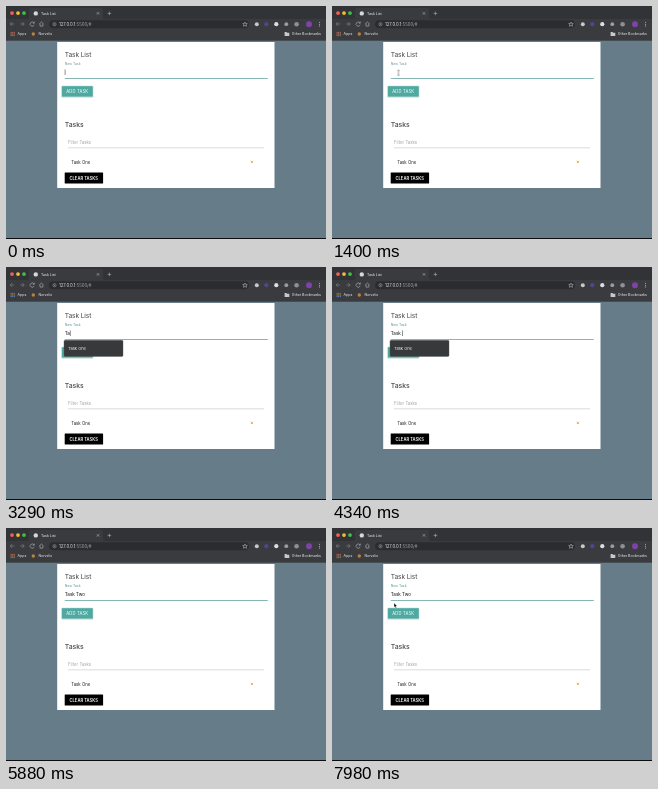
Write an HTML page that moves like this. It is 320 by 233 pixels and loops after 8000 ms.

```html
<!DOCTYPE html>
<html lang="en">
<head>
<meta charset="utf-8">
<title>Task List</title>
<style>
  html, body { margin: 0; width: 100%; height: 100%; overflow: hidden; background: #667d89; }
  svg { display: block; width: 100%; height: 100%; }
  text { font-family: Inter, Roboto, sans-serif; white-space: pre; }
  .chrome { font-size: 3.5px; font-weight: 500; fill: #d4d5d8; }
  .url { font-size: 4.3px; fill: #e4e5e7; }
  .dim { fill: #a3a5a9; }
  .title { font-size: 6.6px; letter-spacing: -.1px; fill: #444; }
  .strong { font-size: 6.8px; font-weight: 500; letter-spacing: 0; }
  .body { font-size: 4.3px; fill: #222; }
  .button { font-size: 4.2px; letter-spacing: .15px; fill: #fff; }
  .icon { fill: none; stroke: #b4b6b9; stroke-width: .6; }

  #label { font-size: 3.4px; animation: focus 8s linear infinite; }
  #typed { font-size: 4.5px; fill: #111; }
  #list { animation: list 8s step-end infinite; }
  #mouse { animation: move 8s ease-in-out infinite, show 8s step-end infinite; }
  #arrow { animation: arrow 8s step-end infinite; }
  #beam { animation: beam 8s step-end infinite; }

  @keyframes focus {
    0%, 15.75% { fill: #7f8f93; }
    19.25%, 100% { fill: #5a979b; }
  }
  @keyframes list {
    0% { opacity: 0; }
    18.375% { opacity: 1; }
    59.5%, 100% { opacity: 0; }
  }
  @keyframes move {
    0%, 5.25% { transform: translate(6px, 10px); }
    10.5% { transform: translate(98px, 42px); }
    14.875%, 97.125% { transform: translate(66.5px, 66.7px); }
    99.75%, 100% { transform: translate(62px, 75px); }
  }
  @keyframes show {
    0% { opacity: 0; }
    5.25% { opacity: 1; }
    37.625% { opacity: 0; }
    97.125%, 100% { opacity: 1; }
  }
  @keyframes arrow {
    0% { opacity: 1; }
    13.5% { opacity: 0; }
    98.75%, 100% { opacity: 1; }
  }
  @keyframes beam {
    0% { opacity: 0; }
    13.5% { opacity: 1; }
    98.75%, 100% { opacity: 0; }
  }
</style>
</head>
<body>
<svg viewBox="0 0 320 233" preserveAspectRatio="none">
  <!-- Browser window -->
  <rect width="320" height="233" fill="#667d89"/>
  <rect y="232" width="320" height="1" fill="#0c0d0e"/>
  <rect width="320" height="34.7" fill="#3a3b3f"/>
  <rect width="320" height="13" fill="#323336"/>
  <path d="M21 13q2 0 2-2V4q0-2 2-2H95q2 0 2 2v7q0 2 2 2z" fill="#3a3b3f"/>
  <circle cx="6" cy="7.1" r="1.9" fill="#ee6259"/>
  <circle cx="12" cy="7.1" r="1.9" fill="#efbc3c"/>
  <circle cx="18" cy="7.1" r="1.9" fill="#41bf4c"/>
  <circle cx="29.8" cy="7.4" r="2.2" fill="#d5d7da"/>
  <text class="chrome" x="35" y="8.8">Task List</text>
  <path class="icon" d="M90.8 6.2l2.4 2.4m0-2.4l-2.4 2.4M101.6 7.4h3.6m-1.8-1.8v3.6"/>

  <rect x="43" y="14.2" width="200" height="8" rx="4" fill="#2b2c30"/>
  <path class="icon" d="M8.2 18H4.2m2-2l-2 2 2 2M14.2 18h4m-2-2l2 2-2 2" style="stroke:#85878b"/>
  <path class="icon" d="M28 17a2.1 2.1 0 1 0 .2 1.8M28.3 15.6V17.2h-1.6M33.2 18l2.2-2 2.2 2M34 17.6v2.5h2.8v-2.5"/>
  <circle class="icon" cx="48.5" cy="18.2" r="1.6" style="stroke-width:.5"/>
  <path class="icon" d="M48.5 18v1M48.5 17v.4" style="stroke-width:.5"/>
  <text class="url" x="53" y="19.8">127.0.0.1<tspan class="dim">:5500/#</tspan></text>
  <path class="icon" d="M239 16l.7 1.5 1.6.1-1.2 1.1.4 1.6-1.5-.9-1.5.9.4-1.6-1.2-1.1 1.6-.1z"/>
  <circle cx="250.8" cy="18.2" r="2" fill="#c6c8cb"/>
  <circle cx="260.3" cy="18.2" r="2.1" fill="#4f4690"/>
  <circle cx="270.3" cy="18.2" r="2.1" fill="#dcdee2"/>
  <circle cx="280.3" cy="18.2" r="1.9" fill="#9b9da0"/>
  <circle cx="290.6" cy="18.2" r="2.3" fill="#8e9094"/>
  <circle cx="303" cy="18.2" r="3" fill="#7d43a8"/>
  <g fill="#c6c8cb">
    <circle cx="313.5" cy="16.3" r=".5"/><circle cx="313.5" cy="18.2" r=".5"/><circle cx="313.5" cy="20.1" r=".5"/>
  </g>

  <g stroke-width="1" stroke-dasharray="1 .6">
    <path d="M4.6 26.4h4.2" stroke="#c9685f"/>
    <path d="M4.6 28h4.2" stroke="#c7a24a"/>
    <path d="M4.6 29.6h4.2" stroke="#5f8cc8"/>
  </g>
  <text class="chrome" x="11.6" y="29.3">Apps</text>
  <circle cx="27.3" cy="28" r="1.7" fill="#bd823e"/>
  <text class="chrome" x="32.4" y="29.3">Norvelix</text>
  <path d="M278.6 26h1.9l.6.7h2.2v3.3h-4.7z" fill="#c6c8cb"/>
  <text class="chrome" x="285.8" y="29.3">Other Bookmarks</text>

  <!-- Page -->
  <rect x="51.2" y="36" width="217.3" height="146" fill="#fff"/>
  <text class="title" x="58.8" y="50.6">Task List</text>
  <text id="label" x="58.8" y="59.3">New Task</text>
  <text id="typed" x="58.8" y="67.9"></text>
  <rect id="caret" y="63.4" width=".5" height="5.6" fill="#222"/>
  <rect x="58.8" y="72" width="203" height="1" fill="#86b7b5"/>

  <rect x="55.3" y="79.7" width="32" height="11.7" rx="1" fill="#b7d3d0"/>
  <rect x="56" y="80.2" width="30.7" height="10.3" rx=".6" fill="#4ea9a1"/>
  <text class="button" x="60.2" y="87">ADD TASK</text>

  <text class="title strong" x="58.8" y="120.5">Tasks</text>
  <text class="body" x="62" y="137.6" style="fill:#a4a4a4">Filter Tasks</text>
  <rect x="62" y="141.6" width="196" height=".6" fill="#c4c4c4"/>
  <text class="body" x="65.2" y="157.5">Task One</text>
  <path d="M244.8 154.8l2.2 2.2m0-2.2l-2.2 2.2" stroke="#dda95a" stroke-width=".9"/>
  <rect x="58.7" y="166.5" width="38.4" height="11" rx=".5" fill="#000"/>
  <text class="button" x="63.4" y="173.6" style="font-weight:600;letter-spacing:0">CLEAR TASKS</text>

  <g id="list">
    <rect x="58" y="73.2" width="59" height="16.2" rx="1.2" fill="#38393b" stroke="#55575a" stroke-width=".4"/>
    <text x="62.2" y="82.8" font-size="4" fill="#f0f0f0">Task One</text>
  </g>

  <g id="mouse">
    <path id="arrow" d="M0 0v4.3l1-.9.7 1.6.8-.4-.7-1.5h1.3z" fill="#111" stroke="#fff" stroke-width=".3"/>
    <path id="beam" d="M-1-2.6q1 0 1 .7 0-.7 1-.7M0-2v4M-1 2.6q1 0 1-.7 0 .7 1 .7" fill="none" stroke="#333" stroke-width=".45"/>
  </g>
</svg>
<script>
  const LOOP = 8000, BLINK = 525, INPUT_X = 58.8;
  const entry = 'Task Two';
  const keyTimes = [3080, 3290, 3500, 3710, 4340, 4760, 5180, 5320];
  const typed = document.getElementById('typed');
  const caret = document.getElementById('caret');
  let start;

  // The caret blink restarts with every key.
  function caretVisible(t, count) {
    if (t < 70) return true;
    const since = t - (count ? keyTimes[count - 1] : 1715);
    return since >= 0 && Math.floor(since / BLINK) % 2 === 0;
  }

  function draw(now) {
    start ??= now;
    const t = (now - start) % LOOP;
    const count = keyTimes.filter(time => time <= t).length;
    typed.textContent = entry.slice(0, count);
    const width = count ? typed.getComputedTextLength() : 0;
    caret.setAttribute('x', INPUT_X + width);
    caret.setAttribute('opacity', caretVisible(t, count) ? 1 : 0);
    requestAnimationFrame(draw);
  }
  requestAnimationFrame(draw);
</script>
</body>
</html>
```
